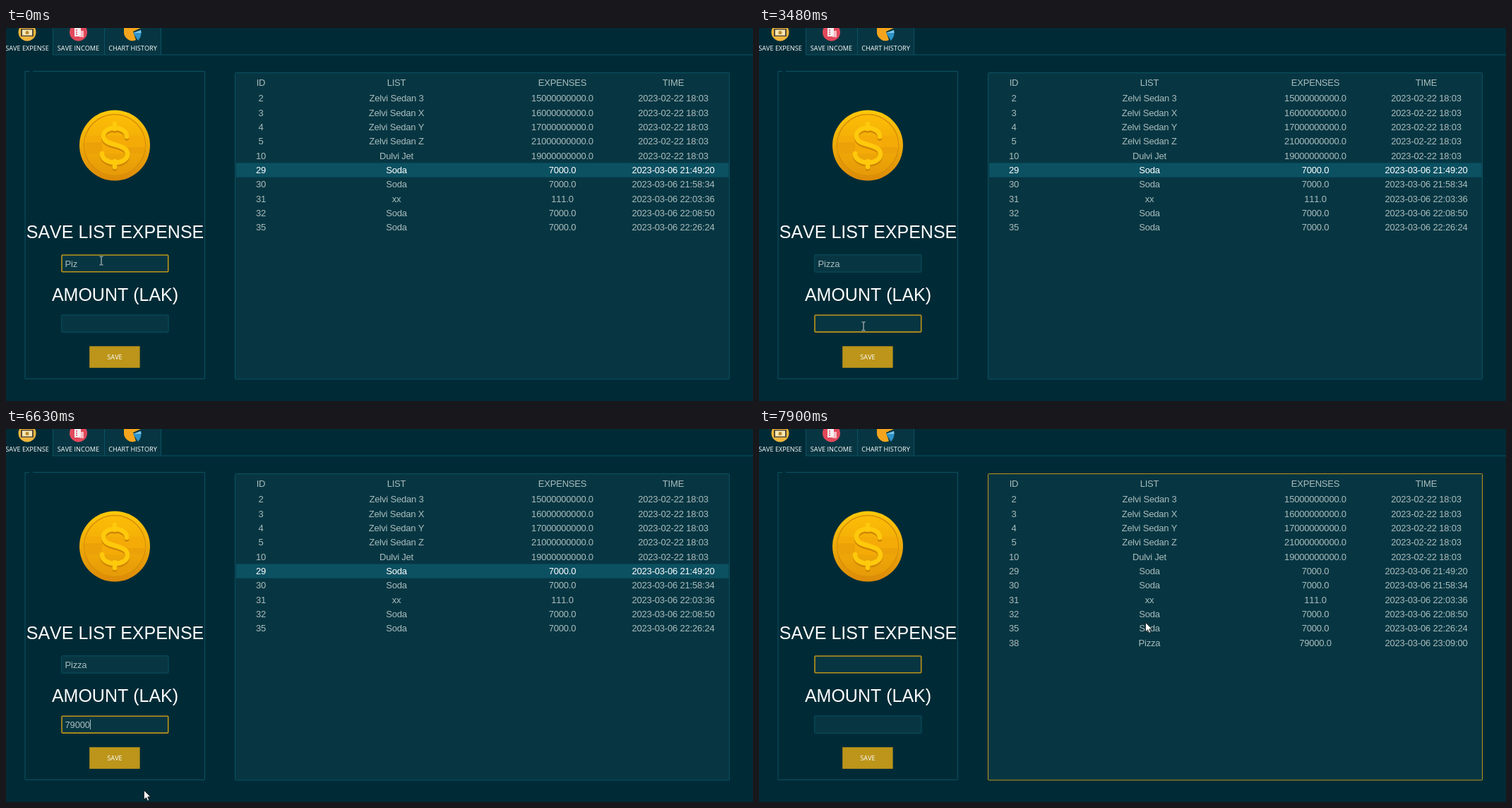
These frames come from a looping animation (1058 by 529 pixels, 8000 ms). An HTML page:

```html
<!DOCTYPE html>
<html lang="en">
<head>
<meta charset="utf-8">
<title>Expense tracker</title>
<style>
  html, body { margin: 0; height: 100%; overflow: hidden; background: #002b36; }
  svg { display: block; width: 100vw; height: 100vh; }
  text { fill: #a9bdbd; font: 13px "Liberation Sans", Arial, sans-serif; letter-spacing: -.2px; white-space: pre; }
  .mid { text-anchor: middle; }
  .title { font-size: 25px; letter-spacing: 0; fill: #fff; }
  .label { font: 9.15px "Open Sans", "Noto Sans", sans-serif; letter-spacing: 0; fill: #fff; }
  text, .label { font-kerning: none; }
  .selected text { fill: #fff; }
  .line { fill: none; stroke: #0b5162; }
  .box { fill: #073642; stroke: #0b5162; }
</style>
</head>
<body>
<svg viewBox="0 0 1058 529">
  <defs>
    <linearGradient id="rim" x2="0" y2="1"><stop stop-color="#ffc90a"/><stop offset="1" stop-color="#dc8a08"/></linearGradient>
    <linearGradient id="face" x2="0" y2="1"><stop stop-color="#fdbd06"/><stop offset="1" stop-color="#e59a08"/></linearGradient>
    <clipPath id="disc"><circle cx="154" cy="166" r="43"/></clipPath>
    <path id="dollar" d="M171 154C171 138 138 138 138 153C138 169 172 162 172 179C172 195 136 195 136 178M154 136V143M154 189V197"/>
  </defs>

  <!-- tabs -->
  <path fill="#073642" d="M67 0H220V38H67Z"/>
  <path class="line" d="M66.5 0V38H1058M139.5 0V38M219.5 0V38"/>
  <g>
    <circle cx="30" cy="6" r="12.5" fill="#efb53c"/>
    <path fill="#594b35" d="M21 1H39V12H21Z"/>
    <path fill="#f7e6b5" d="M23 2.5H37V10.5H23Z"/>
    <circle cx="30" cy="6.5" r="2.5" fill="#b98a2e"/>
    <circle cx="102.5" cy="6" r="12.5" fill="#e2485b"/>
    <path fill="#f6eef0" d="M97 0H106V12H97Z"/>
    <path fill="#f5b8bf" d="M106 4H110V13H104V11H106Z"/>
    <path stroke="#e2485b" stroke-width="1.5" d="M99 3H101M99 6H101M99 9H101"/>
    <path fill="#f5a51d" d="M167 4A12 13 0 0 0 184 17L180 5 191 0H167Z"/>
    <path fill="#2f93c8" d="M180 7L191 3Q193 11 187 18Z"/>
    <path fill="#7cc5e6" d="M180 7L191 3 191.5 7Z"/>
  </g>
  <g class="mid">
    <text class="label" x="30" y="31.5">SAVE EXPENSE</text>
    <text class="label" x="102.5" y="31.5">SAVE INCOME</text>
    <text class="label" x="179.5" y="31.5">CHART HISTORY</text>
  </g>

  <!-- form -->
  <path class="line" d="M33 61.5H27V497.5H281.5V61.5H38"/>
  <circle cx="154" cy="166.5" r="50" fill="url(#rim)"/>
  <circle cx="154" cy="166" r="43.5" fill="url(#face)" stroke="#d98e06" stroke-width="1.5"/>
  <g clip-path="url(#disc)">
    <path fill="#f5ab07" d="M110 153H198V178H110Z"/>
    <path fill="#eca108" d="M110 162H136V178H110ZM170 169H198V178H170Z"/>
  </g>
  <g fill="none" stroke-width="6.5" stroke-linecap="round">
    <use href="#dollar" y="2.5" stroke="#cf8506"/>
    <use href="#dollar" stroke="#ffc90c"/>
  </g>
  <g class="mid">
    <text class="title" x="154.5" y="298">SAVE LIST EXPENSE</text>
    <text class="title" x="154.5" y="387">AMOUNT (LAK)</text>
  </g>
  <rect class="box field" rx="1"/><rect class="box field" rx="1"/>
  <text class="value" x="83.6" y="338.7"/><text class="value" x="83.6" y="424"/>
  <path id="caret" stroke="#a9bdbd" d="M.5 0V14"/>
  <rect id="button" x="118.2" y="451.3" width="71.4" height="30.6"/>
  <text class="label mid" x="154" y="470">SAVE</text>

  <!-- table -->
  <rect id="table" class="box" x="324.5" y="63.5" width="700" height="434.5" rx="1"/>
  <rect id="highlight" x="326" y="191.4" width="697.5" height="20.3" fill="#0b5162"/>
  <g id="rows" class="mid"></g>

  <!-- pointers -->
  <path id="beam" fill="none" stroke="#d5d5d5" d="M-2.5-6H-.5L0-5.500.5-6H2.5M0-5.500V5.500M-2.5 6H-.5L0 5.500.5 6H2.5"/>
  <path id="arrow" fill="#fff" stroke="#111" stroke-width=".8" d="M.5 .5V13.5L3.5 10.7 5.6 15.3 7.7 14.4 5.7 9.8H9.8Z"/>
</svg>
<script>
const LOOP = 8000, GOLD = '#bc951a', TEAL = '#0b5162';
const $ = id => document.getElementById(id);
const set = (el, attrs) => { for (const k in attrs) el.setAttribute(k, attrs[k]); };
const show = (el, on) => set(el, { visibility: on ? 'visible' : 'hidden' });

const oldDay = '2023-02-22 18:03', newDay = '2023-03-06 ';
const table = [
  ['ID', 'LIST', 'EXPENSES', 'TIME'],
  [2, 'Zelvi Sedan 3', '15000000000.0', oldDay],
  [3, 'Zelvi Sedan X', '16000000000.0', oldDay],
  [4, 'Zelvi Sedan Y', '17000000000.0', oldDay],
  [5, 'Zelvi Sedan Z', '21000000000.0', oldDay],
  [10, 'Dulvi Jet', '19000000000.0', oldDay],
  [29, 'Soda', '7000.0', newDay + '21:49:20'],
  [30, 'Soda', '7000.0', newDay + '21:58:34'],
  [31, 'xx', '111.0', newDay + '22:03:36'],
  [32, 'Soda', '7000.0', newDay + '22:08:50'],
  [35, 'Soda', '7000.0', newDay + '22:26:24'],
  [38, 'Pizza', '79000.0', newDay + '23:09:00']
];
const columns = [361, 553, 788, 945];
const rows = table.map((cells, i) => {
  const row = document.createElementNS('http://www.w3.org/2000/svg', 'g');
  const y = i ? 104.2 + (i - 1) * 20.36 : 81.5;
  row.innerHTML = cells.map((c, j) => `<text x="${columns[j]}" y="${y}">${c}</text>`).join('');
  return $('rows').appendChild(row);
});

// Each track holds [start time, ...values]
const typed = [
  [[0, 'Piz'], [250, 'Pizz'], [400, 'Pizza'], [7230, '']],
  [[0, ''], [4320, '7'], [4780, '79'], [5000, '790'], [5220, '7900'], [6020, '79000'], [7230, '']]
];
const focus = [[0, 0], [1930, 1], [7230, 0]];
const mouse = [
  [0, 135, 330], [1270, 138, 350], [1430, 144, 395], [1600, 148, 447], [1760, 149, 430], [1930, 148, 423],
  [6300, 160, 445], [6460, 185, 488], [6620, 195, 512], [6780, 182, 490], [6930, 173, 467],
  [7630, 245, 425], [7760, 410, 345], [7900, 547, 274]
];
const blinks = [250, 830, 1110, 2490, 2800, 3480, 3760, 4320, 4570, 5220, 5590, 6140, 6490, 7080, 7230, 7900];
const at = (track, t) => track.findLast(step => step[0] <= t).slice(1);

const fields = document.querySelectorAll('.field'), values = document.querySelectorAll('.value');
const fieldTop = [321.2, 406.5];
const inside = (x, y, left, top, right, bottom) => x > left && x < right && y > top && y < bottom;

function draw(t) {
  const [x, y] = at(mouse, t), [active] = at(focus, t), saved = t >= 7230;
  let overField = false;

  fields.forEach((field, i) => {
    const top = fieldTop[i], hover = inside(x, y, 78, top, 231, top + 26);
    const inset = i === active ? .8 : .5;
    overField ||= hover;
    set(field, {
      x: 78.2 + inset, y: top + inset, width: 152.3 - 2 * inset, height: 25.4 - 2 * inset,
      style: `stroke:${i === active || hover ? GOLD : TEAL};stroke-width:${2 * inset}`
    });
    values[i].textContent = at(typed[i], t)[0];
  });

  const caretX = 84 + Math.round(values[active].getComputedTextLength());
  set($('caret'), { transform: `translate(${caretX} ${Math.floor(fieldTop[active] + 6)})` });
  show($('caret'), blinks.filter(b => b <= t).length % 2);

  set($('button'), { fill: inside(x, y, 118, 451, 190, 482) ? '#a98617' : GOLD });
  $('table').style.stroke = inside(x, y, 324, 63, 1025, 498) ? GOLD : TEAL;
  show($('highlight'), !saved);
  set(rows[6], { class: saved ? '' : 'selected' });
  show(rows[11], saved);

  show($('beam'), overField);
  show($('arrow'), !overField);
  for (const id of ['beam', 'arrow']) set($(id), { transform: `translate(${x} ${y})` });
}

const start = performance.now();
function tick() {
  draw((performance.now() - start) % LOOP);
  requestAnimationFrame(tick);
}
tick();
</script>
</body>
</html>
```
